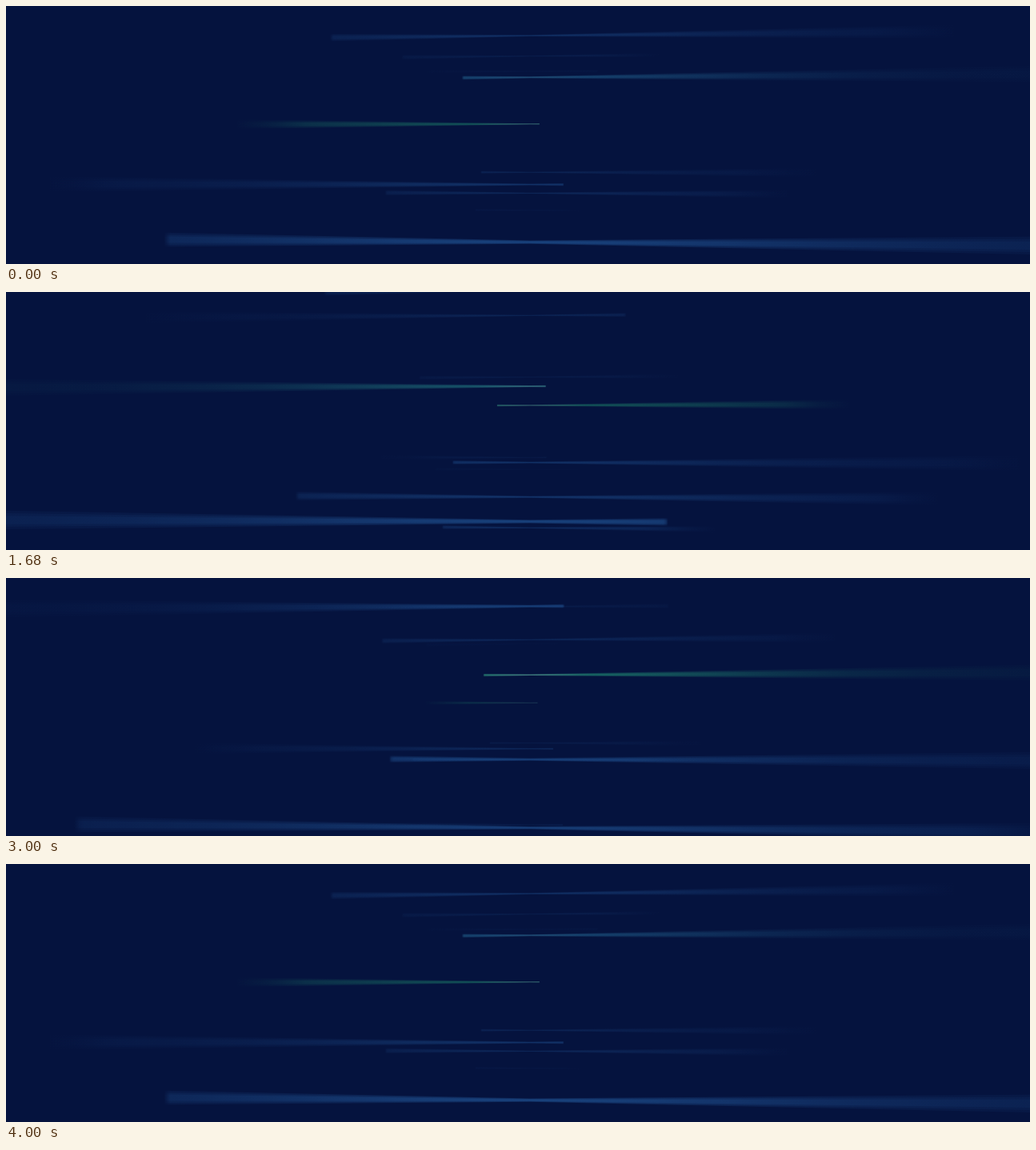
An HTML page with a canvas that plays this animation: 1280x323 px, repeating every 4040 ms.

```html
<!DOCTYPE html>
<html lang="en">
<head>
<meta charset="utf-8">
<title>Light streaks</title>
<style>
  html, body { margin: 0; width: 100%; height: 100%; overflow: hidden; background: #05133e; }
  canvas { display: block; width: 1280px; height: 323px; }
</style>
</head>
<body>
<canvas id="stage" width="1280" height="323"></canvas>
<script>
const ctx = document.getElementById('stage').getContext('2d');
const LOOP = 4040, CYCLE = 4000, STEP = 40;
const CENTER = 655, HORIZON = 190;
const BLUE = [34, 88, 154], GREEN = [32, 146, 112], PALE = [190, 230, 225];

// Each streak flies past the viewer between born and arrive (ms).
// push: sideways offset x time left; rise, bend: height per offset;
// growth: how fast the tail runs the other way (px per ms).
const streaks = [
  { born: -1561, arrive: 4180, push: 51e3, level: 192, rise: -3.63, growth: 0.237, green: true },
  { born: -111, arrive: 6220, push: -189e3, level: 192, rise: -1.2, growth: 0.225, green: true },
  { born: -3390, arrive: 2230, push: 95e3, level: 190, rise: 0.86, bend: -0.0017, growth: 0.18 },
  { born: -2467, arrive: 4625, push: -286e3, level: 200, rise: 0.12, bend: 0.00018, growth: 0.15 },
  { born: 371, arrive: 6900, push: -725e3, level: 192, rise: -0.61, growth: 0.148 },
  { born: -1417, arrive: 4450, push: -714e3, level: 170, rise: -0.66, growth: 0.12 },
  { born: -690, arrive: 5740, push: 488e3, level: 209, rise: -1.5, growth: 0.21 },
  { born: 1920, arrive: 7200, push: 730e3, level: 188, rise: -0.88, growth: 0.1875 },
  { born: -3000, arrive: 4400, push: -798e3, level: 199, rise: 0.192, growth: 0.11 },
  { born: 1954, arrive: 6750, push: 156e3, level: 218, rise: 2.19, growth: 0.197 },
  { born: -670, arrive: 4500, push: -310e3, level: 190, rise: 0.95, growth: 0.1 }
];

const clamp = v => Math.max(0, Math.min(1, v));
const mix = (a, b, k) => a.map((v, i) => v + (b[i] - v) * k);

function drawStreak(s, t) {
  if (t < s.born + 200 || t > s.arrive - 150) return;

  const life = (t - s.born) / (s.arrive - s.born);
  const side = Math.sign(s.push);
  const offset = Math.abs(s.push) / (s.arrive - t);
  const headX = CENTER + side * offset;
  const headY = s.level + s.rise * offset + (s.bend || 0) * offset * offset;
  const tailX = CENTER - side * s.growth * (t - s.born);
  const length = Math.abs(tailX - headX);

  const slope = (headY - HORIZON) * (side < 0 ? 6.5e-5 : 3e-5);
  const thin = 1 + 4 * life ** 3;
  const yAt = x => headY + (x - headX) * slope;
  const halfAt = x => (thin + 0.026 * Math.abs(x - CENTER)) / 2;

  const turn = s.green ? clamp((life - 0.47) / 0.23) : 1;
  const base = mix(GREEN, BLUE, turn);
  const glow = s.green ? Math.min(1, life * 2.4) * (1 - 0.3 * turn) : life ** 1.3;
  const reach = s.green ? 260 : 150 + 200 * life;
  const floor = 0.05 + (s.green ? 0 : 0.2 * life ** 2);

  const fill = ctx.createLinearGradient(headX, 0, tailX, 0);
  const parts = 40;
  for (let i = 0; i <= parts; i++) {
    const k = (i / parts) ** 2;
    const u = Math.abs(headX + (tailX - headX) * k - CENTER);
    const fadeIn = clamp(k * length / halfAt(headX));
    const fadeOut = clamp((1 - k) * length / Math.min(90, length * 0.4));
    const light = floor + (1 - floor) * Math.exp(-((u / reach) ** 1.6));
    const rgb = mix(base, PALE, 0.45 * (1 - turn) * clamp(1 - u / 70)).map(Math.round);
    fill.addColorStop(k, `rgba(${rgb},${(0.34 * glow * light * fadeIn * fadeOut).toFixed(4)})`);
  }

  // Nested bands soften the edges.
  const xs = [headX, CENTER, tailX];
  ctx.fillStyle = fill;
  for (const spread of [0.5, 0.8, 1.1]) {
    ctx.beginPath();
    for (const x of xs) ctx.lineTo(x, yAt(x) - halfAt(x) * spread);
    for (const x of [...xs].reverse()) ctx.lineTo(x, yAt(x) + halfAt(x) * spread);
    ctx.fill();
  }
}

function render(now) {
  const t = Math.floor((now % LOOP) / STEP) * STEP;
  ctx.fillStyle = '#05133e';
  ctx.fillRect(0, 0, 1280, 323);
  for (const s of streaks)
    for (const shift of [-CYCLE, 0, CYCLE]) drawStreak(s, t + shift);
}

const start = performance.now();
function tick() {
  render(performance.now() - start);
  requestAnimationFrame(tick);
}
tick();
</script>
</body>
</html>
```
